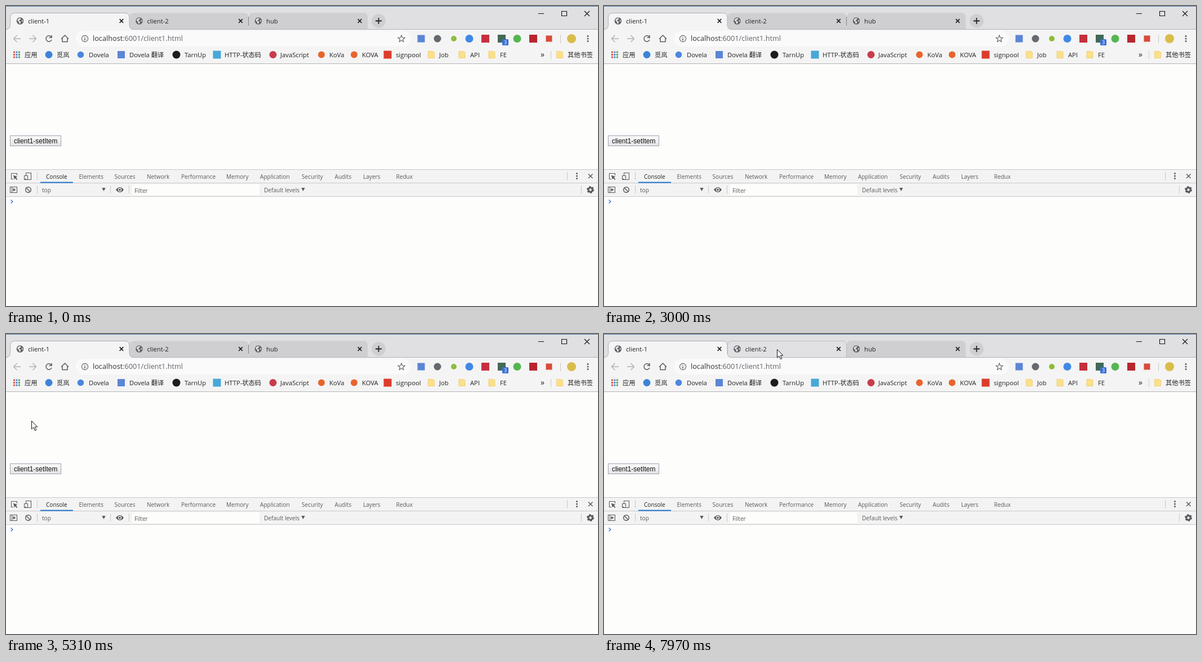
Write an HTML page that moves like this. It is 1051x533 px and loops after 8 s.

```html
<!DOCTYPE html>
<html lang="zh-CN">
<head>
<meta charset="utf-8">
<title>Browser tabs</title>
<style>
html, body { margin: 0; width: 100%; height: 100%; overflow: hidden; background: #fdfdfc; }
svg { display: block; }
text { font-family: "Open Sans", "Noto Sans CJK SC", "Noto Sans CJK", sans-serif; fill: #222; }
.tab, .mark { font-size: 11.25px; }
.tool { font-size: 10.1px; fill: #5a5a5e; }
.url { font-size: 12.7px; fill: #5f6368; }
.button { font: 11.9px "Liberation Sans", Arial, sans-serif; fill: #111; }
.line { fill: none; stroke: #5a5d62; stroke-width: 1.5; }
.thin { fill: none; stroke: #5a5d62; stroke-width: 1.1; }
.rule { fill: none; stroke: #c8c8ca; }
</style>
</head>
<body>
<svg id="stage" width="1051" height="533" viewBox="0 0 1051 533">
  <defs>
    <linearGradient id="face" x2="0" y2="1"><stop stop-color="#fafafa"/><stop offset="1" stop-color="#e4e4e6"/></linearGradient>
    <g id="globe">
      <circle r="6.3" fill="#606266"/>
      <path d="M-5-1.5C-3-5 0-5.3 1.5-4.8L1-2.5-1.5-1.5-1 .5 1.5 1 .5 4.5-1.5 5-2 2ZM3-1.5 5.2-1 4.8 1.5 3.2 1Z" fill="#e4e4e6"/>
    </g>
    <path id="close" d="M-3.3-3.3 3.3 3.3M3.3-3.3-3.3 3.3" fill="none" stroke="#222" stroke-width="1.7"/>
    <path id="folder" d="M-5.5-6H2L5.5-4.5V6H-5.5Z" fill="#fbe08a" stroke="#eccb68" stroke-width=".8"/>
    <path id="caret" d="M-3.2-3H3.2L0 3Z" fill="#5a5a5e"/>
    <g id="dots" fill="#55585c"><circle cy="-4.6" r="1.5"/><circle r="1.5"/><circle cy="4.6" r="1.5"/></g>
  </defs>

  <rect width="1051" height="533" fill="#fdfdfc"/>
  <rect width="1051" height="42" fill="#e0e0e2"/>
  <path d="M0 .5H1051" stroke="#4c7fac"/>
  <path id="tabTwo" d="M219.5 41.5V20.5Q219.5 12.5 227.5 12.5H422.5Q430.5 12.5 430.5 20.5V41.5Z"/>
  <path d="M431 41V20Q431 12 439 12H634Q642 12 642 20V41Z" fill="#cfcfd1"/>
  <path id="tabSplit" d="M430.5 19V35" stroke="#85868a"/>
  <rect y="41" width="1051" height="61" fill="#f4f4f4"/>
  <path d="M0 41.5H1051" stroke="#b4b4b9"/>
  <path d="M0 42V41.5Q7.5 41.5 7.5 33.5V20.5Q7.5 12.5 15.5 12.5H211Q219 12.5 219 20.5V33.5Q219 41.5 227 41.5V42Z" fill="#f4f4f4"/>
  <path d="M0 41.5Q7.5 41.5 7.5 33.5V20.5Q7.5 12.5 15.5 12.5H211Q219 12.5 219 20.5V33.5Q219 41.5 227 41.5" fill="none" stroke="#b0b0b5"/>
  <g id="tabs"></g>
  <circle cx="661.5" cy="26.5" r="12.5" fill="#cfcfd2"/>
  <path d="M656 26.5H667M661.5 21V32" stroke="#222" stroke-width="1.8"/>
  <path d="M945 13.5H955M986.5 9.5H995.5V17.5H986.5ZM1027 9 1036 18M1036 9 1027 18" fill="none" stroke="#111" stroke-width="1.1"/>

  <path class="line" d="M26 58H13.5M19.5 52 13.5 58 19.5 64M41 58H53.5M47.5 52 53.5 58 47.5 64" style="stroke:#b2b3b7"/>
  <path class="line" d="M80.5 55A5.2 5.2 0 1 0 81 60M81 52V56.3H76.5M98 58.5 104.5 52 111 58.5M100 57.5V63.5H109V57.5"/>
  <rect x="124" y="44" width="594" height="28" rx="14" fill="#fafafb"/>
  <circle class="thin" cx="140" cy="58" r="5.6"/>
  <path class="line" d="M140 57.2V61.3M140 54.7V56"/>
  <text class="url" x="154" y="62"><tspan fill="#333">localhost</tspan>:6001/client1.html</text>
  <path class="thin" d="M702 52 703.6 56.1 708 56.4 704.6 59.2 705.7 63.5 702 61.1 698.3 63.5 699.4 59.2 696 56.4 700.4 56.1Z"/>
  <g id="extensions"></g>
  <rect x="881" y="59" width="11" height="11" rx="1.5" fill="#3c6fd8"/>
  <text x="886.5" y="68" text-anchor="middle" style="font-size:9px;fill:#fff">3</text>
  <path class="rule" d="M984.5 51V66"/>
  <use href="#dots" x="1033" y="58"/>

  <g id="apps"></g>
  <g id="bookmarks"></g>
  <text class="mark" x="949" y="91" style="font-size:14px">»</text>
  <path class="rule" d="M967.5 80V94"/>
  <path d="M0 102.5H1051" stroke="#b3b3b5"/>

  <rect id="button" x="7.5" y="230.5" width="90" height="18" fill="url(#face)"/>
  <text class="button" x="14" y="244">client1-setItem</text>

  <rect y="290" width="1051" height="48" fill="#f3f3f3"/>
  <path class="rule" d="M0 290.5H1051M0 314.5H1051M0 338.5H1051M55.5 295V309M996.5 295V309M55.5 319V333M185.5 319V333M218.5 319V333M1021.5 319V333"/>
  <path d="M61 313.5H119" stroke="#2479d0" stroke-width="2"/>
  <path class="thin" d="M19.5 301V297.5H9.5V307.5H13M36 307.5H32.5V301.5H38.5V308.5H32.5M35.5 301V296.5H44.5V308.5H39"/>
  <path d="M13 300.5 20.5 303.5 17.5 304.7 20.5 307.7 19.2 309 16.2 306 15 308.5Z" fill="#55585c"/>
  <use href="#dots" x="1013.5" y="302"/>
  <path class="line" d="M1034 298.5 1041.5 306M1041.5 298.5 1034 306"/>
  <rect class="thin" x="7.5" y="321.5" width="12" height="10"/>
  <path d="M10.5 321V332" stroke="#5a5d62"/>
  <path d="M12.5 323.5 17.5 326.5 12.5 329.5Z" fill="#55585c"/>
  <circle class="line" cx="39.5" cy="326.5" r="4.8"/>
  <path class="line" d="M36 323 43 330"/>
  <use href="#caret" x="173.5" y="326"/>
  <path d="M195 326.5Q202 317.5 209 326.5 202 335.5 195 326.5Z" fill="#55585c"/>
  <circle cx="202" cy="326.5" r="2.5" fill="#55585c" stroke="#f3f3f3" stroke-width="1.3"/>
  <rect x="224" y="317" width="226" height="19" fill="#fdfdfc"/>
  <use href="#caret" x="527.5" y="326"/>
  <circle cx="1037.5" cy="326.5" r="3.7" fill="none" stroke="#55585c" stroke-width="3"/>
  <circle cx="1037.5" cy="326.5" r="5.5" fill="none" stroke="#55585c" stroke-width="2" stroke-dasharray="2.88"/>
  <g id="tools"></g>
  <path d="M8.5 344.5 12 347.5 8.5 350.5" fill="none" stroke="#3978df" stroke-width="1.4"/>

  <path id="cursor" d="M0 0V14.5L3.4 11.4 6 17.2 8.3 16.2 5.8 10.5H10.3Z" fill="#fff" stroke="#111"/>
</svg>
<script>
const byId = id => document.getElementById(id);
const fill = (id, parts) => { byId(id).innerHTML = parts.join(""); };
const label = (kind, x, y, words) => `<text class="${kind}" x="${x}" y="${y}">${words}</text>`;
const use = (id, x, y) => `<use href="#${id}" x="${x}" y="${y}"/>`;
const disc = (x, y, color, r = 6.5) => `<circle cx="${x}" cy="${y}" r="${r}" fill="${color}"/>`;
const square = (x, y, color, s = 14) =>
  `<rect x="${x - s / 2}" y="${y - s / 2}" width="${s}" height="${s}" fill="${color}"/>`;

fill("tabs", ["client-1", "client-2", "hub"].map((name, i) => {
  const x = i * 211.5;
  return use("globe", 25 + x, 26.5) + label("tab", 39 + x, 31, name) + use("close", 205 + x, 26.5);
}));

fill("extensions", [
  square(737, 58, "#5b86d4", 13), disc(766, 58, "#66696d"), disc(795, 58, "#8fbd3c", 5),
  disc(822.5, 58, "#4189e8", 7), square(851, 58, "#c62f3c"), square(880, 58, "#426957"),
  disc(907.5, 58, "#54b650", 7), square(936, 58, "#b7262f"), square(964, 58, "#d94a3d", 11),
  disc(1004, 58, "#d9bd4c", 8)
]);

const appColors = ["#d95444", "#4787dc", "#50a55d", "#e5b33e"];
fill("apps", Array.from({ length: 9 }, (_, i) =>
  square(14.5 + i % 3 * 4.5, 82 + Math.floor(i / 3) * 4.5, appColors[(i + Math.floor(i / 3)) % 4], 3)));

const folder = x => use("folder", x, 86.5);
const bookmarks = [
  [33, "应用", ""],
  [90, "觅岚", disc(76, 86.5, "#3d83d8")],
  [147, "Dovela", disc(132.5, 86.5, "#4b86df", 5.8)],
  [219, "Dovela 翻译", square(204.5, 86.5, "#5b86d4", 13)],
  [317, "TarnUp", disc(302.5, 86.5, "#1d1d20", 7)],
  [388, "HTTP-状态码", square(374.5, 86.5, "#49a8d6")],
  [487, "JavaScript", disc(474, 86.5, "#c73d4b")],
  [574, "KoVa", disc(560, 86.5, "#e8642c", 6)],
  [632, "KOVA", disc(618, 86.5, "#e8642c", 6)],
  [692, "signpool", square(677.5, 86.5, "#dc3c2c")],
  [769, "Job", folder(755)],
  [824, "API", folder(809.5)],
  [877, "FE", folder(862.5)],
  [997, "其他书签", folder(983)]
];
fill("bookmarks", bookmarks.map(([x, name, icon]) => icon + label("mark", x, 91, name)));

const panels = {
  Console: 71, Elements: 129.5, Sources: 192.5, Network: 250, Performance: 311, Memory: 391,
  Application: 451, Security: 525, Audits: 583.5, Layers: 634, Redux: 692.5
};
fill("tools", [
  ...Object.entries(panels).map(([name, x]) => label("tool", x, 307, name)),
  label("tool", 64, 331, "top"), label("tool", 228, 331.5, "Filter"),
  label("tool", 458, 331, "Default levels")
]);
byId("tools").firstChild.style.fill = "#222";

const duration = 8000;
const cursorShown = 4400;
const path = [
  [4400, 57, 13], [4600, 52, 15], [4850, 52, 15], [5650, 41, 242],
  [6750, 41, 242], [7600, 307, 27], [8000, 307, 27]
];
const ease = p => p * p * (3 - 2 * p);

function cursorAt(time) {
  const next = Math.max(1, path.findIndex(point => point[0] > time));
  const [t0, x0, y0] = path[next - 1];
  const [t1, x1, y1] = path[next];
  const p = ease(Math.max(0, (time - t0) / (t1 - t0)));
  return [x0 + (x1 - x0) * p, y0 + (y1 - y0) * p];
}

function render(time) {
  const visible = time >= cursorShown;
  const [x, y] = cursorAt(time);
  const over = (left, top, right, bottom) => visible && x >= left && x < right && y >= top && y < bottom;

  const cursor = byId("cursor");
  cursor.setAttribute("visibility", visible ? "visible" : "hidden");
  cursor.setAttribute("transform", `translate(${Math.round(x) + .5} ${Math.round(y) + .5})`);

  const tabHover = over(219, 12, 430, 41);
  byId("tabTwo").setAttribute("fill", tabHover ? "#e1e1e4" : "#cfcfd1");
  byId("tabTwo").setAttribute("stroke", tabHover ? "#bcbcc0" : "none");
  byId("tabSplit").setAttribute("visibility", tabHover ? "hidden" : "visible");
  byId("button").setAttribute("stroke", over(7, 230, 98, 249) ? "#6c6d75" : "#a0a1ae");
}

const start = performance.now();
function tick() {
  render((performance.now() - start) % duration);
  requestAnimationFrame(tick);
}
tick();
</script>
</body>
</html>
```
